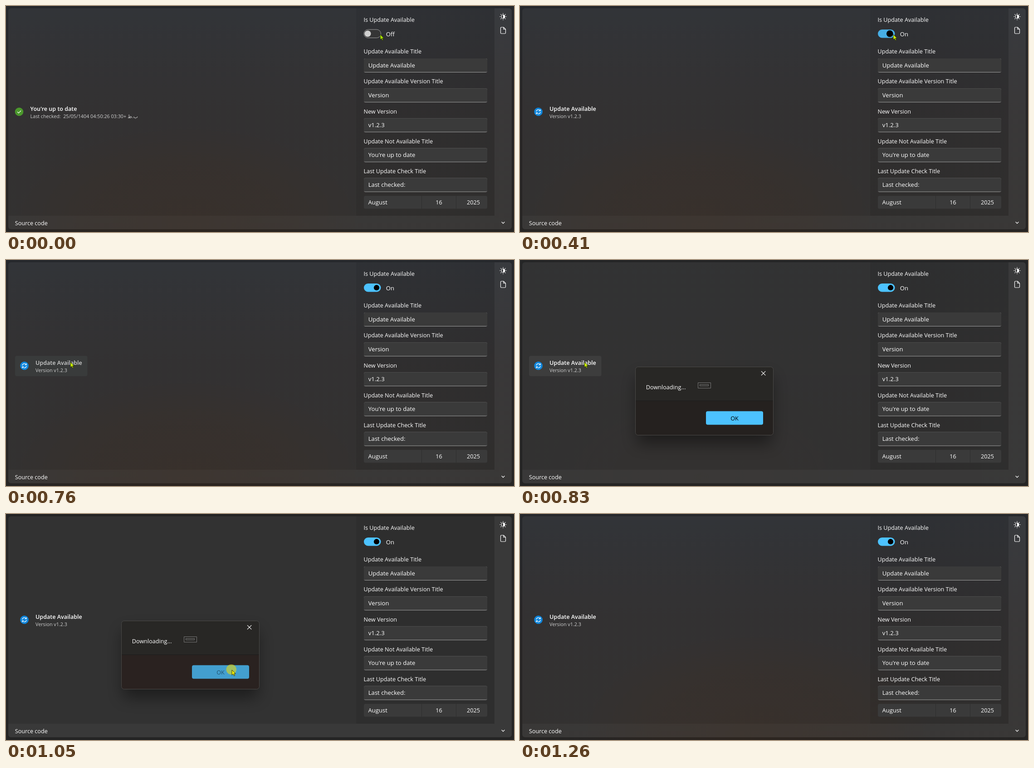
These frames come from a looping animation (1120x500 px, 1.33 s). An HTML page:

```html
<!DOCTYPE html>
<html lang="en">
<head>
<meta charset="utf-8">
<title>Update card demo</title>
<style>
html, body { margin: 0; width: 100%; height: 100%; overflow: hidden; background: #242424; }
svg { display: block; width: 1120px; height: 500px; }
text { font: 12.65px "Open Sans", "Noto Sans", "DejaVu Sans", sans-serif; fill: #fff; white-space: pre; }
.field { font-size: 13.1px; }
.title { font-size: 12.55px; font-weight: 600; }
.sub { font-size: 10.75px; fill: #cfcfcf; }
.mid { text-anchor: middle; }
.line { fill: none; stroke: #fff; stroke-width: 1.2; stroke-linecap: round; stroke-linejoin: round; }
</style>
</head>
<body>
<svg viewBox="0 0 1120 500">
  <defs>
    <linearGradient id="cool" x2="0" y2="1">
      <stop offset="0" stop-color="#32466a" stop-opacity=".11"/>
      <stop offset=".45" stop-color="#3c2c34" stop-opacity=".1"/>
      <stop offset="1" stop-color="#3c2c20" stop-opacity=".1"/>
    </linearGradient>
    <radialGradient id="warm">
      <stop offset="0" stop-color="#602800" stop-opacity=".11"/>
      <stop offset=".6" stop-color="#602800" stop-opacity=".07"/>
      <stop offset="1" stop-color="#602800" stop-opacity="0"/>
    </radialGradient>
    <filter id="blur" x="-30%" y="-30%" width="160%" height="180%"><feGaussianBlur stdDeviation="17"/></filter>
    <clipPath id="window"><rect x="5" y="5" width="1110" height="489" rx="6"/></clipPath>
  </defs>

  <g clip-path="url(#window)">
    <path fill="#323232" d="M5 5h767v459H5z"/>
    <path fill="#2e2e2e" d="M772 5h305v459H772z"/>
    <path fill="#393939" d="M1077 5h38v459h-38zM5 464h1110v30H5z"/>
  </g>
  <g id="tint">
    <path fill="url(#cool)" d="M0 0h1120v500H0z"/>
    <ellipse id="glow" cy="480" rx="390" ry="220" fill="url(#warm)"/>
  </g>

  <text x="788.5" y="35">Is Update Available</text>
  <g id="form"></g>
  <rect x="789" y="420" width="272" height="28.5" rx="3.5" fill="#3a3a3a"/>
  <path stroke="#2e2e2e" d="M916.5 420v29M992.5 420v29"/>
  <text class="field" x="798.5" y="438.8">August</text>
  <text class="mid" x="954.5" y="438.8">16</text>
  <text class="mid" x="1030.5" y="438.8">2025</text>
  <text x="19.7" y="485">Source code</text>
  <path class="line" d="M1093 478l3 3 3-3"/>
  <circle class="line" cx="1096" cy="23.5" r="4"/>
  <path fill="#fff" d="M1096 19.5a4 4 0 0 1 0 8z"/>
  <g id="rays"></g>
  <path class="line" d="M1092 47h5l4.5 4.5v8q0 1.500-1.500 1.500h-8q-1.500 0-1.500-1.500v-11q0-1.500 1.500-1.500zM1097 47v4.500h4.500"/>

  <rect id="track" x="789" y="52" width="37.500" height="18.500" rx="9.250"/>
  <circle id="knob" cy="61.200"/>
  <text id="state" class="field" x="837.800" y="66.500"></text>

  <g id="current">
    <circle cx="29" cy="234" r="9.300" fill="#4b972c"/>
    <path class="line" d="M25.500 234.500l2.300 2.300 4.800-4.800"/>
    <text class="title" x="53.600" y="232">You're up to date</text>
    <text class="sub" x="53.600" y="247.500">Last checked:  25/05/1404 04:50:26 03:30+ ب.ظ</text>
  </g>
  <g id="update">
    <rect id="card" x="20" y="212" width="159.500" height="45" rx="4"/>
    <circle cx="40.500" cy="234" r="9.300" fill="#0f86dc"/>
    <path class="line" stroke-width="1" d="M36 233a4.700 4.700 0 0 1 8.500-1.500M45 229v3h-3M45 235a4.700 4.700 0 0 1-8.500 1.500M36 239v-3h3"/>
    <text id="cardTitle" class="title" x="65" y="232">Update Available</text>
    <text class="sub" x="65" y="247.500">Version v1.2.3</text>
  </g>

  <g id="dialog">
    <rect x="258" y="258" width="297" height="148" rx="8" opacity=".42" filter="url(#blur)"/>
    <rect x="254.500" y="236.500" width="304" height="151" rx="6" fill="#282725"/>
    <path id="footer" d="M255 311.500h303.500v70q0 6-6 6h-292q-6 0-6-6z"/>
    <path stroke="#1c1b1a" d="M255 311.500h303"/>
    <rect x="254.500" y="236.500" width="304" height="151" rx="6" fill="none" stroke="#4a4947"/>
    <path class="line" d="M532.300 246.300l8.600 8.600m0-8.600l-8.600 8.600"/>
    <text x="277.800" y="286">Downloading...</text>
    <path fill="none" stroke="#777" d="M392.500 271.500h28v12h-28zM396.500 275.500h19v3h-19z"/>
    <rect id="ok" x="410" y="334.500" width="126" height="30" rx="4"/>
    <text id="okText" class="mid" x="473" y="354.500">OK</text>
  </g>

  <g id="cursor">
    <circle id="press" cx="-1.200" cy="-1" r="11.200" fill="#dcd41e" opacity=".63"/>
    <path id="arrow" stroke="#181c08" stroke-width=".8" d="M0 0v11.500l2.700-2.500 2 4.200 1.900-.900-2-4.100h3.700z"/>
  </g>
</svg>
<script>
const $ = id => document.getElementById(id);
const set = (id, attrs) => { for (const k in attrs) $(id).setAttribute(k, attrs[k]); };
const show = (id, on) => set(id, { visibility: on ? "visible" : "hidden" });

const fields = [
  ["Update Available Title", "Update Available"],
  ["Update Available Version Title", "Version"],
  ["New Version", "v1.2.3"],
  ["Update Not Available Title", "You're up to date"],
  ["Last Update Check Title", "Last checked:"]
];
$("form").innerHTML = fields.map(([label, value], i) => `<g transform="translate(788.5 ${116 + i * 66.15})">
  <text y="-10.7">${label}</text>
  <rect x=".5" width="272" height="31" rx="3.5" fill="#a0a0a0"/>
  <path fill="#3a3a3a" d="M4 0h265q3.500 0 3.500 3.500v25q0 1.500-3.500 1.500H4q-3.500 0-3.500-1.500v-25Q.5 0 4 0z"/>
  <text class="field" x="10.3" y="19.700">${value}</text></g>`).join("");
$("rays").innerHTML = [0, 1, 2, 3, 4, 5, 6, 7].map(i =>
  `<path class="line" transform="rotate(${i * 45} 1096 23.500)" d="M1096 17.200v-.900"/>`).join("");

const LOOP = 1330;
const ticks = [0, 70, 140, 200, 270, 340, 410, 480, 550, 620, 690, 760, 830, 910, 980, 1050, 1120, 1190, 1260];

// keys: [time, ...values], interpolated linearly
function along(keys, t) {
  const i = keys.findIndex(k => k[0] > t);
  if (i < 0) return keys[keys.length - 1].slice(1);
  const a = keys[i - 1], b = keys[i], p = (t - a[0]) / (b[0] - a[0]);
  return a.slice(1).map((v, j) => v + (b[j + 1] - v) * p);
}

const path = [[0, 825, 63], [140, 828, 63], [270, 828, 63], [410, 823, 63], [550, 816, 67], [620, 560, 120],
  [690, 165, 222], [760, 142, 226], [830, 142, 226], [910, 270, 280], [980, 480, 340], [1050, 498, 345]];
const knob = [[0, 797.5, 7], [270, 797.5, 7], [340, 808, 7.3], [410, 815.3, 7.4], [480, 817, 7], [550, 817, 7], [620, 817, 6.1]];
const tint = [[0, 1], [760, 1], [830, .25], [910, 0], [1120, 0], [1190, .4], [1260, 1]];

function draw(now) {
  const time = now % LOOP;
  const t = ticks.filter(s => s <= time).pop();
  const on = t >= 340, overToggle = t < 620;
  const pressed = t >= 200 && t < 340 || t === 1050;

  set("tint", { opacity: along(tint, t)[0] });
  set("glow", { cx: t < 1190 ? 400 : 520 });

  const [kx, kr] = along(knob, t);
  set("knob", { cx: kx, r: kr, fill: on ? "#000" : "#cfcfcf" });
  set("track", on ? { fill: overToggle ? "#47aee5" : "#4cc2ff", stroke: "none" } : { fill: "#353535", stroke: "#a0a0a0" });
  $("state").textContent = on ? "On" : "Off";

  show("current", !on);
  show("update", on);
  set("card", { fill: t < 690 || t >= 910 ? "none" : t === 760 ? "#393b3b" : "#3d3d3d" });
  $("cardTitle").style.fill = t === 760 ? "#cfcfcf" : "#fff";

  show("dialog", t >= 830 && t < 1190);
  set("footer", { fill: t < 910 ? "#25211f" : "#2a2220" });
  set("ok", { fill: t < 980 ? "#4cc2ff" : t === 1050 ? "#439fcf" : "#48b2e9" });
  $("okText").style.fill = t === 1050 ? "#235470" : "#000";

  const [x, y] = along(path, t);
  set("cursor", { transform: `translate(${x} ${y})` });
  show("cursor", t < 1260);
  set("press", { opacity: pressed ? .63 : 0 });
  set("arrow", { fill: pressed ? "#f4ee00" : t < 200 ? "#a6de00" : "#ccf400" });
}

const start = performance.now();
function frame() {
  draw(performance.now() - start);
  requestAnimationFrame(frame);
}
frame();
</script>
</body>
</html>
```
